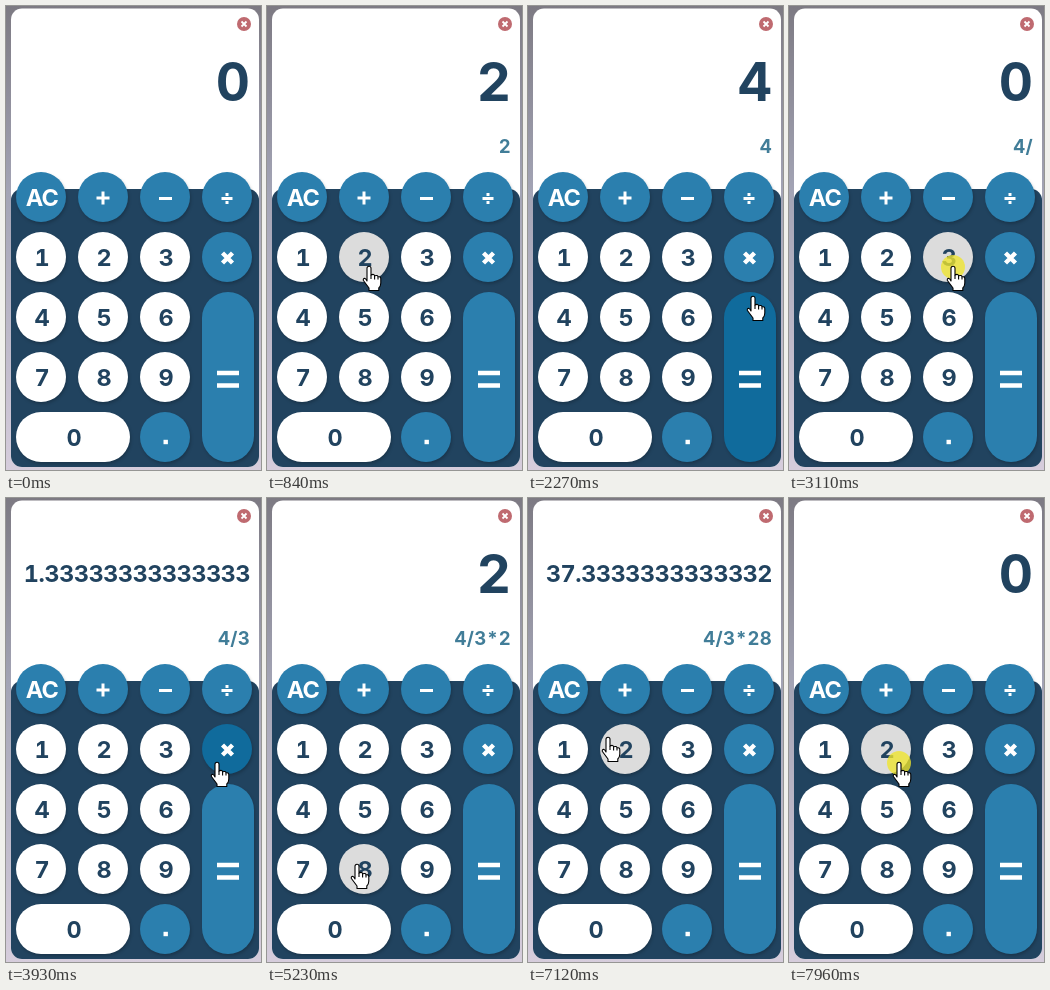
An HTML page that plays this animation: 255x464 px, repeating every 7.99 s.

```html
<!DOCTYPE html>
<html lang="en">
<head>
<meta charset="utf-8">
<title>Calculator</title>
<style>
  html, body { margin: 0; width: 100%; height: 100%; overflow: hidden; }
  svg { display: block; width: 255px; height: 464px; }
  text {
    font-family: Inter, Roboto, sans-serif; font-weight: 650;
    font-variant-numeric: tabular-nums; font-variant-ligatures: no-contextual;
  }
  .label { font-size: 23.5px; text-anchor: middle; fill: #21435f; }
  .light { fill: #fff; letter-spacing: -.8px; }
  .icon { fill: none; stroke: #fff; stroke-width: 3px; }
  .bold { stroke-width: 4.4px; }
  #total, #sum { text-anchor: end; }
  #total { fill: #21435f; font-size: 53px; font-weight: 700; }
  #total.long { font-size: 23.5px; font-weight: 650; letter-spacing: -.5px; }
  #sum { fill: #417d98; font-size: 18.5px; letter-spacing: .3px; }
  .key { filter: drop-shadow(1px 2px 1.5px rgba(0, 0, 0, .2)); }
</style>
</head>
<body>
<svg viewBox="0 0 255 464">
  <defs>
    <linearGradient id="sky" x2="0" y2="1">
      <stop offset="0" stop-color="#7d7a83"/>
      <stop offset=".4" stop-color="#a3a4b5"/>
      <stop offset="1" stop-color="#d6cddc"/>
    </linearGradient>
  </defs>
  <rect width="255" height="464" fill="url(#sky)"/>
  <rect x="5" y="2.5" width="248" height="458.5" rx="11" fill="#fff"/>
  <rect x="5" y="183" width="248" height="278" rx="11" fill="#21435f"/>
  <circle cx="238" cy="18" r="7" fill="#bf6a70"/>
  <path d="M235.5 15.5l5 5m0-5l-5 5" stroke="#fff" stroke-width="1.8"/>
  <text id="total" x="244"></text>
  <text id="sum" x="244" y="147"></text>
  <g id="keys"></g>
  <circle id="press" r="12" fill="#f0e62d" opacity=".78"/>
  <g id="cursor" stroke="#000" stroke-width="1.1" stroke-linejoin="round">
    <g id="hand" transform="translate(0 -1)">
      <path fill="#fff" d="M-2 15V2.2a2 2 0 0 1 4 0V9q3-1.5 3.6.8 3-1 3.4 1 2.8-.6 2.8 2V17q0 3-2 5v2.5H0V22q-3-4-5.6-7.5-.6-2 1.4-2.2 1 .2 2.2 2.7z"/>
      <path fill="none" d="M2 9v4M5.6 10v3.5M9 11v2.5"/>
    </g>
    <path id="arrow" fill="#fff" d="M0 0v17l4-4 3 7 3-1.3-3-6.7h5.5z"/>
  </g>
</svg>
<script>
const LOOP = 7990, PRESS = 100, REST = 150, TRAVEL = 250;
const $ = id => document.getElementById(id);

function add(tag, attrs, text = '') {
  const el = document.createElementNS('http://www.w3.org/2000/svg', tag);
  for (const name in attrs) el.setAttribute(name, attrs[name]);
  el.textContent = text;
  return $('keys').appendChild(el);
}

// Operator signs, drawn around the key centre
const icons = {
  '+': 'M-6.5 1h13M0 -5.5v13',
  '-': 'M-6 1.5h13',
  '/': 'M-5.5 1.5h11M0 -4v3M0 4v3',
  '*': 'M-4.5 -4l10 10m0-10l-10 10',
  '=': 'M-11 -4h22m-22 12.5h22',
  '.': 'M-1.5 5h4.4'
};

const keys = {};
function addKey(label, col, row, w = 50, h = 50) {
  const x = 10 + col * 62, y = 166 + row * 60;
  const cx = x + w / 2, cy = y + h / 2, r = Math.min(w, h) / 2;
  const blue = !/\d/.test(label);
  const box = add('rect', { x, y, width: w, height: h, rx: r, class: 'key' });
  if (icons[label]) {
    add('path', { d: icons[label], transform: `translate(${cx} ${cy})`,
      class: /[*=.]/.test(label) ? 'icon bold' : 'icon' });
  } else {
    add('text', { x: cx + 1, y: cy + 8.5, class: blue ? 'label light' : 'label' }, label);
  }
  keys[label] = { box, blue, cx, cy, r, w, h };
}

['AC+-/', '123*', '456', '789'].forEach((line, row) =>
  line.match(/AC|./g).forEach((label, col) => addKey(label, col, row)));
addKey('=', 3, 2, 52, 170);
addKey('0', 0, 4, 114);
addKey('.', 2, 4);

// Pointer stops: key, arrival, click, offset from the key centre
const stops = [
  ['9', 0, 80, 21, 3],
  ['2', 330, 690],
  ['+', 1050, 1080],
  ['2', 1340, 1370, 1, 24],
  ['=', 1900, 2060, 3, -80],
  ['/', 2570, 2600],
  ['3', 2960, 3110],
  ['=', 3450, 3480, -4, -50],
  ['*', 3880, 4080, -10, 14],
  ['2', 4390, 4720],
  ['8', 5230, 5560, -7, -4],
  ['=', 5890, 5910, -11, -6],
  ['AC', 7200, 7360],
  ['2', 7930, 7940, 13, 14]
].map(([label, arrive, click, dx = 5, dy = 10]) =>
  ({ label, arrive, click, x: keys[label].cx + dx, y: keys[label].cy + dy }));
const clicks = stops.slice(1);
const entry = stops[0].click + REST;

function pointerAt(t) {
  if (t < entry) return null;
  let { x, y } = stops[0];
  stops.forEach((to, i) => {
    if (!i) return;
    const leave = Math.max(stops[i - 1].click + REST, to.arrive - TRAVEL);
    const k = Math.min(1, Math.max(0, (t - leave) / (to.arrive - leave)));
    const ease = k * k * (3 - 2 * k);
    x += (to.x - x) * ease;
    y += (to.y - y) * ease;
  });
  return { x, y };
}

const compute = {
  '+': (a, b) => a + b, '-': (a, b) => a - b,
  '*': (a, b) => a * b, '/': (a, b) => a / b
};

function enter(state, label) {
  const { total, sum, left, op } = state;
  if (label === 'AC') return { total: '0', sum: '' };
  if (label === '=') {
    const value = Number(compute[op](left, Number(total)).toPrecision(15));
    return { total: `${value}`, sum: Number.isInteger(value) ? `${value}` : sum };
  }
  if (compute[label]) return { total: '0', sum: sum + label, left: Number(total), op: label };
  return { ...state, total: total === '0' ? label : total + label, sum: sum + label };
}

function hits({ cx, cy, r, w, h }, p) {
  const dx = Math.max(0, Math.abs(p.x - cx) - w / 2 + r);
  const dy = Math.max(0, Math.abs(p.y - cy) - h / 2 + r);
  return Math.hypot(dx, dy) <= r;
}

const show = (el, on) => el.setAttribute('visibility', on ? 'visible' : 'hidden');

function draw(t) {
  const pos = pointerAt(t);
  let over = false;
  for (const key of Object.values(keys)) {
    const hot = pos !== null && hits(key, pos);
    over = over || hot;
    const [idle, hover] = key.blue ? ['#2b7fae', '#106b9c'] : ['#fff', '#dcdcdc'];
    key.box.setAttribute('fill', hot ? hover : idle);
  }

  const { total, sum } = clicks.filter(c => c.click + PRESS <= t)
    .reduce((state, c) => enter(state, c.label), { total: '0', sum: '' });
  const long = total.length > 9;
  $('total').textContent = total;
  $('total').classList.toggle('long', long);
  $('total').setAttribute('y', long ? 84 : 95);
  $('sum').textContent = sum;

  show($('hand'), pos && over);
  show($('arrow'), pos && !over);
  show($('press'), clicks.some(c => c.click <= t && t < c.click + PRESS));
  if (pos) {
    const place = `translate(${Math.round(pos.x)} ${Math.round(pos.y)})`;
    $('cursor').setAttribute('transform', place);
    $('press').setAttribute('transform', place);
  }
}

const start = performance.now();
function tick() {
  draw((performance.now() - start) % LOOP);
  requestAnimationFrame(tick);
}
tick();
</script>
</body>
</html>
```
